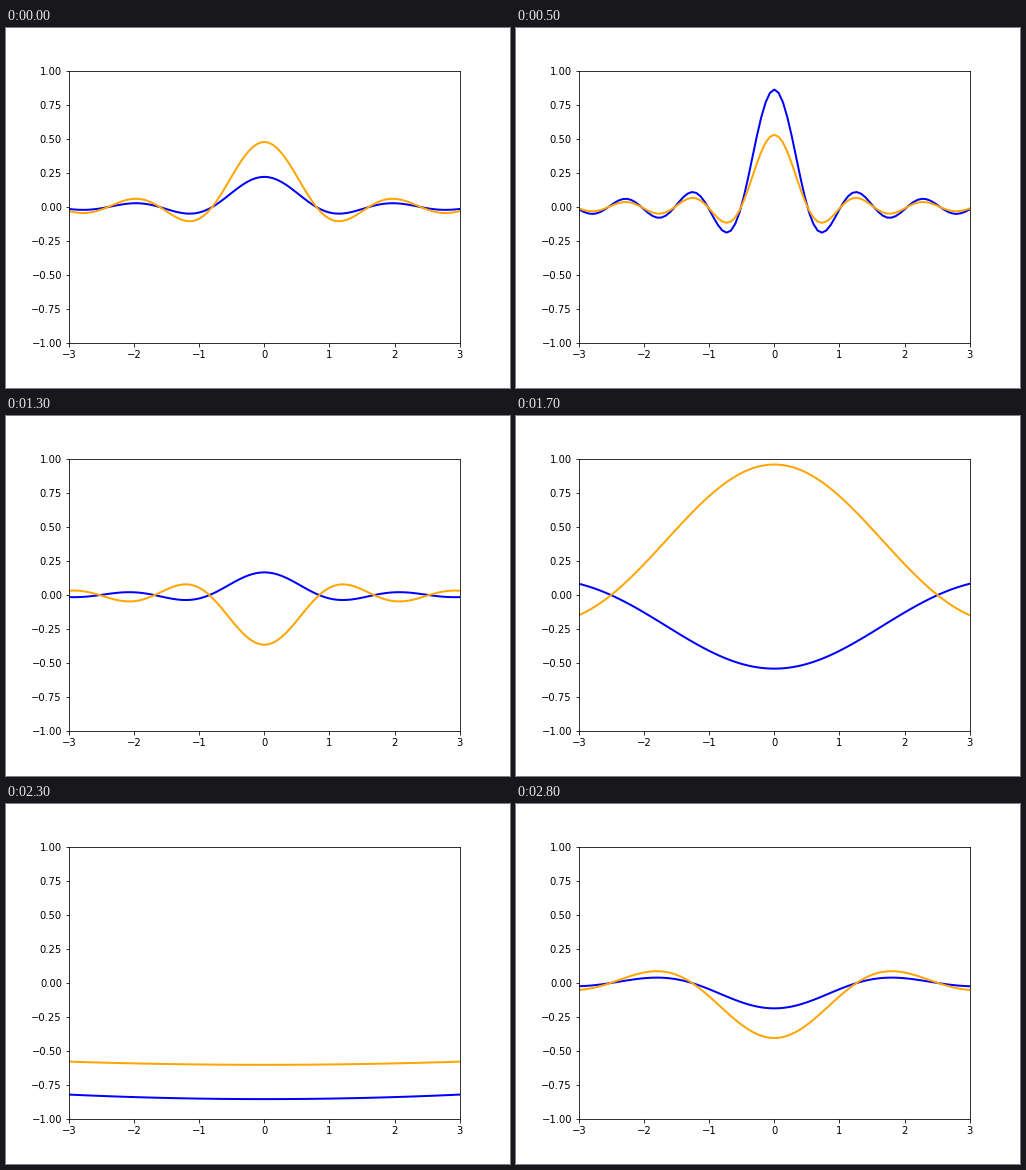
Animation, 504 px wide and 360 px high, one loop 2900 ms. Source, as a matplotlib script:

```python
import numpy as np
import matplotlib.pyplot as plt
from matplotlib.animation import FuncAnimation

FRAMES = 29
STEP_MS = 100
START, END = 0.25, 2 * np.pi

x = np.linspace(-3, 3, 91)

fig, ax = plt.subplots(figsize=(7, 5), dpi=72, facecolor="white")
fig.subplots_adjust(left=0.125, right=0.9, bottom=0.125, top=0.88)
ax.set_xlim(-3, 3)
ax.set_ylim(-1, 1)
ax.tick_params(labelsize=10)
blue, = ax.plot([], [], color="blue", lw=2)
orange, = ax.plot([], [], color="orange", lw=2)


def update(i):
    phase = START + (END - START) * i / FRAMES
    wave = np.sinc((1 + np.sin(phase)) * x)
    blue.set_data(x, 0.9 * np.sin(phase) * wave)
    orange.set_data(x, np.sin(2 * phase) * wave)
    return blue, orange


def init():
    return update(0)


anim = FuncAnimation(fig, update, frames=FRAMES, init_func=init,
                     interval=STEP_MS, repeat=True)
plt.show()
```
